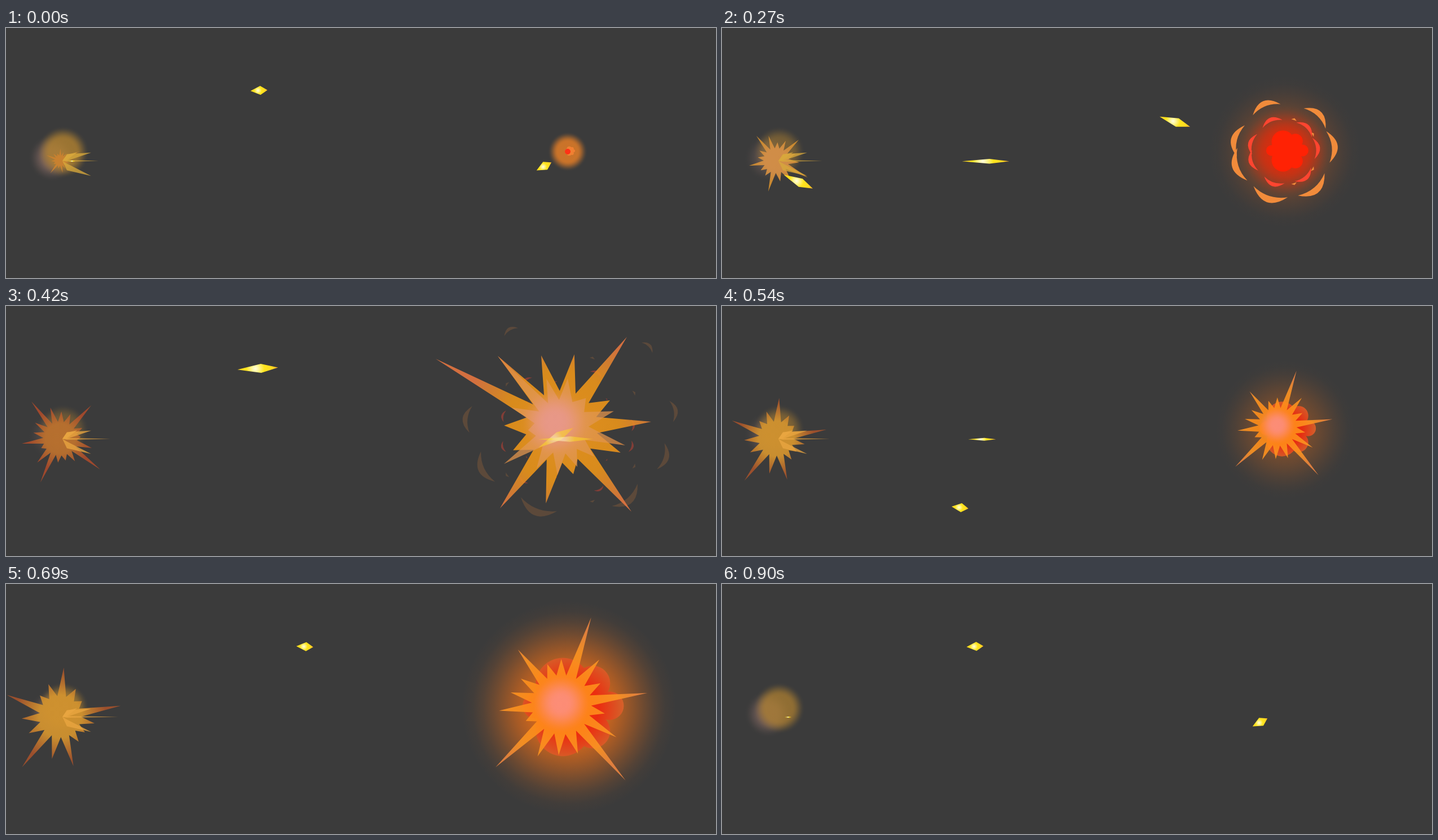
Animation of 1259x445 px, one loop 930 ms. Source, as an HTML page with a canvas:

```html
<!DOCTYPE html>
<html lang="en">
<head>
<meta charset="utf-8">
<title>Muzzle flash and explosion</title>
<style>
html, body { margin: 0; width: 100%; height: 100%; overflow: hidden; background: #3b3b3b; }
canvas { display: block; width: 100vw; height: 100vh; }
</style>
</head>
<body>
<canvas id="stage" width="1259" height="445"></canvas>
<script>
const ctx = document.getElementById('stage').getContext('2d');
const STEP = 30, FRAMES = 31, TAU = 2 * Math.PI, DEG = Math.PI / 180;
const MUZZLE = [96, 236], BLAST = [996, 220], BURST = [985, 215];

const ramp = (f, from, to) => Math.min(1, Math.max(0, (f - from) / (to - from)));
const lerp = (a, b, k) => a + (b - a) * k;
const noise = n => Math.abs(Math.sin(n * 127.1) * 43758.5) % 1;

function radial(x, y, r, stops) {
  const g = ctx.createRadialGradient(x, y, 0, x, y, r);
  for (const [at, color] of stops) g.addColorStop(at, color);
  return g;
}

// Draw in a local frame, then restore the context
function within([x, y], scale, alpha, paint) {
  if (alpha <= 0) return;
  ctx.save();
  ctx.translate(x, y);
  ctx.scale(scale, scale);
  ctx.globalAlpha = alpha;
  paint();
  ctx.restore();
}

// Soft disc: solid up to a share of its radius, then an S-shaped falloff
function glow(x, y, r, solid, rgb, alpha) {
  const stops = [];
  for (let i = 0; i <= 8; i++) {
    const k = i / 8, fade = 1 - k * k * (3 - 2 * k);
    stops.push([solid + (1 - solid) * k, `rgba(${rgb},${alpha * fade})`]);
  }
  ctx.fillStyle = radial(x, y, r, stops);
  ctx.beginPath();
  ctx.arc(x, y, r, 0, TAU);
  ctx.fill();
}

// Star with clockwise long spikes; shorter random ones fill the gaps between them
function star(center, { spikes, short, inner, gap, seed = 1 }, scale, fill, alpha) {
  const long = spikes.map(([x, y]) => {
    const dx = x - center[0], dy = y - center[1];
    return { a: Math.atan2(dy, dx), r: Math.hypot(dx, dy) };
  });
  within(center, scale, alpha, () => {
    const point = (a, r) => ctx.lineTo(r * Math.cos(a), r * Math.sin(a));
    ctx.beginPath();
    long.forEach(({ a, r }, i) => {
      const span = (long[(i + 1) % long.length].a - a + TAU) % TAU;
      const n = Math.max(1, Math.round(span / gap));
      for (let j = 0; j < n; j++) {
        const length = j ? short * lerp(.75, 1.25, noise(seed + i * 7 + j)) : r;
        point(a + span * j / n, length);
        point(a + span * (j + .5) / n, inner);
      }
    });
    ctx.fillStyle = fill;
    ctx.fill();
  });
}

// Five large lobes around a core; the right one is the smallest
function cloud(scale, fill, alpha = 1) {
  within([1000, 219], scale, alpha, () => {
    ctx.beginPath();
    ctx.arc(5, 0, 52, 0, TAU);
    const lobe = (x, y, r) => {
      ctx.moveTo(x + r, y);
      ctx.arc(x, y, r, 0, TAU);
    };
    for (const side of [-1, 1]) {
      lobe(-11, side * 34, 42);
      lobe(35, side * 37, 27);
    }
    lobe(61, -2, 22);
    lobe(-53, -2, 20);
    ctx.fillStyle = fill;
    ctx.fill();
  });
}

// Ring of crescents: heavier and closer at the bottom by the ring's lean
function ring({ angles, radius, chord, lean, chips, chipSize, color }, scale, alpha) {
  within(BLAST, scale, alpha, () => {
    ctx.fillStyle = color;
    for (const deg of angles) {
      const low = Math.sin((deg - 10) * DEG) * lean;
      const r = radius * (1 - low * .38), half = chord * (1 + low) / 2;
      ctx.save();
      ctx.rotate(deg * DEG);
      ctx.beginPath();
      ctx.moveTo(r, -half);
      ctx.quadraticCurveTo(r + half * 1.24, 0, r, half);
      ctx.quadraticCurveTo(r + half * .5, 0, r, -half);
      ctx.fill();
      ctx.restore();
    }
    for (const deg of chips) {
      for (const side of [-1, 1]) {
        ctx.save();
        ctx.rotate(side * deg * DEG);
        ctx.translate(radius * .77, 0);
        ctx.beginPath();
        ctx.moveTo(-chipSize * .2, -chipSize);
        ctx.lineTo(chipSize * .5, 0);
        ctx.lineTo(-chipSize * .2, chipSize);
        ctx.fill();
        ctx.restore();
      }
    }
  });
}

const ORANGE = '#f18b3b', RED = '#ff4530';
const outerAngles = [-120, -46, -10, 16, 49, 111, 155, 186];
const innerAngles = [-130, -63, -4, 15, 62, 131, 165, 192];
const tightAngles = [-112, -47, -6, 50, 108, 163, 194];
const wideRings = [
  { angles: outerAngles, radius: 175, chord: 46, lean: .5, chips: [29, 71, 143], chipSize: 5, color: ORANGE },
  { angles: innerAngles, radius: 114, chord: 21, lean: -.1, chips: [38, 104, 146], chipSize: 2.5, color: RED }
];
const tightRings = [
  { angles: tightAngles, radius: 78, chord: 58, lean: .1, chips: [31, 72], chipSize: 5, color: ORANGE },
  { angles: tightAngles, radius: 53, chord: 38, lean: 0, chips: [], chipSize: 0, color: RED }
];

const backBurst = {
  spikes: [[949, 88], [1101, 55], [1144, 206], [1109, 366], [876, 360], [762, 94], [872, 89]],
  short: 114, inner: 64, gap: .52
};
const frontBurst = { spikes: [[872, 89], [996, 129], [1098, 248], [883, 281]], short: 78, inner: 48, gap: .5 };
const lateBurst = {
  spikes: [[1030, 82], [1115, 197], [1082, 330], [885, 310], [919, 131]],
  short: 78, inner: 45, gap: .36
};

// Muzzle stars; each grows through its own full size at frame "at"
const flashes = [
  { at: 5, until: 6, short: 29, inner: 16, mid: '#e9a850', tip: '#e2a034',
    spikes: [[97, 198], [158, 206], [104, 274], [65, 276], [53, 219]] },
  { at: 9, until: 11, short: 37, inner: 22, mid: '#d48f48', tip: '#cf8c2e',
    spikes: [[61, 192], [136, 199], [152, 266], [82, 291], [48, 245]] },
  { at: 14, until: 17, short: 48, inner: 30, mid: '#b9702e', tip: '#a4492c',
    spikes: [[45, 170], [151, 177], [167, 291], [61, 314], [28, 245]] },
  { at: 21, until: 23, short: 58, inner: 34, mid: '#d0922f', tip: '#a0502c',
    spikes: [[102, 155], [196, 218], [118, 318], [33, 320], [8, 200]] },
  { at: 26, until: 29, short: 72, inner: 43, mid: '#f9c836', tip: '#fdd42c',
    spikes: [[97, 163], [151, 170], [188, 296], [121, 320], [53, 314], [22, 206], [43, 165]] }
];
const flashSize = f => f < 24 ? 24 + 3.7 * f : 84 + 3 * (f - 24);

function drawShards(f) {
  ctx.globalAlpha = .78;
  ctx.fillStyle = f < 12 ? '#d8a83c' : '#e9a641';
  for (const [deg, length, w] of [[26, 61, 6], [-15, 57, 6], [0, 68 + 1.5 * f, 1.5], [-27, 34, 5]]) {
    const x = length * Math.cos(deg * DEG), y = length * Math.sin(deg * DEG);
    ctx.beginPath();
    ctx.moveTo(100, 236.5);
    ctx.lineTo(108, 236.5 + y * .4 - w);
    ctx.lineTo(96 + x, 236.5 + y);
    ctx.lineTo(108, 236.5 + y * .4 + w);
    ctx.fill();
  }
  ctx.globalAlpha = 1;
}

function drawMuzzle(f) {
  const pulse = Math.cos(TAU * f / 26);
  glow(82, 231, 42, .3, '165,125,115', .38 + .17 * pulse);
  glow(101, 221, 46, .5, '178,130,48', .6 + .2 * pulse);
  const flash = flashes.find(s => f <= s.until);
  if (!flash) return;

  const full = flashSize(flash.at), bright = flash.at === 26;
  const fill = radial(0, 0, full, [[.35, flash.mid], [.75, flash.tip]]);
  star(MUZZLE, { ...flash, gap: .38, seed: flash.at }, flashSize(f) / full, f < 3 ? '#cb8230' : fill, .95);
  if (bright) glow(97, 230, 44, .1, '244,206,130', .8);
  else drawShards(f);
}

function drawBlast(f) {
  const [x, y] = BLAST;
  if (f < 3) {
    glow(x, y, 35 + f * 9, .5, '214,120,40', .92);
    cloud(.11 + f * .2, '#f08032');
    glow(x, y, 5.5 + f * 12, .8, '255,50,22', 1);
  } else if (f < 7) {
    glow(x - 1, y, lerp(50, 80, ramp(f, 2, 5)), .3, '245,38,6', 1);
  } else if (f < 13) {
    const fade = 1 - ramp(f, 9, 13);
    glow(x + 2, y, 135, .1, '205,95,30', .5 * fade);
    glow(x + 3, y, 82, .35, '230,40,10', .8 * fade);
    cloud(.48 + .06 * (f - 9), '#ff2204', fade);
  } else if (f >= 17 && f < 24) {
    const grow = ramp(f, 15, 22.5);
    glow(998, 220, lerp(80, 190, grow), .2, '215,105,28', grow);
    cloud(lerp(.3, 1.15, grow), radial(0, 0, 82, [[0, '#f82008'], [.55, '#ec2b10'], [1, '#d8602a']]), .95);
  } else if (f >= 24 && f < 30) {
    const fade = 1 - ramp(f, 26, 30), size = .66 + .14 * (f - 26);
    glow(1000, 218, 215, .1, '125,88,48', .6 * fade);
    glow(1000, 220, 140, .25, '205,45,28', .82 * fade);
    cloud(size, '#f0581e', fade);
    cloud(size * .58, '#ff331a', fade);
    within([1000, 226], size, fade, () => {
      ctx.fillStyle = '#f0581e';
      ctx.fillRect(-45, -1.5, 90, 3);
    });
  }

  // Debris: a tight ring opens, then the wide one fades
  if (f === 2 || f === 8 || f === 9) tightRings.forEach(r => ring(r, f === 9 ? 1 : .82, 1));
  const second = f >= 10;
  const open = second ? ramp(f, 8, 12) : ramp(f, 1, 5);
  const fade = second ? 1 - ramp(f, 9.5, 15) : 1 - ramp(f, 3, 7);
  if (f >= 3 && f !== 8 && f !== 9) {
    ring(wideRings[0], lerp(.6, 1, open), fade);
    ring(wideRings[1], lerp(.6, 1, open), Math.min(1, fade * 2));
  }
}

function drawBursts(f) {
  if (f >= 11 && f < 18) {
    const s = lerp(.55, 1, ramp(f, 11, 14));
    const back = radial(0, 0, 220, [[0, '#f79b1c'], [.45, '#ee9618'], [.65, '#e48530'], [.8, '#e87640']]);
    const front = radial(-12, -8, 160, [[0, '#ea9a78'], [.45, '#e09650'], [1, '#e0883c']]);
    star(BURST, backBurst, s, back, .88);
    star(BURST, frontBurst, s, front, .75);
    glow(973, 207, 62 * s, .2, '232,152,142', .85);
  } else if (f >= 18 && f < 24) {
    const s = lerp(.75, 1.17, ramp(f, 18, 23));
    const fill = radial(0, 0, 140, [[0, '#ff8a30'], [.3, '#ff8c18'], [.6, '#fb9422'], [.85, '#ea8440']]);
    star(BURST, lateBurst, s, fill, .9);
    glow(984, 212, 46 * s, .2, '252,142,126', .9);
  }
}

function kite(x, y, w, h, angle, alpha) {
  within([x, y], 1, alpha, () => {
    ctx.rotate(angle);
    ctx.beginPath();
    ctx.moveTo(-w / 2, 0);
    ctx.lineTo(w * .08, -h);
    ctx.lineTo(w / 2, 0);
    ctx.lineTo(w * .08, h);
    ctx.fillStyle = radial(-w * .06, 0, w * .56, [[0, '#fffde0'], [.14, '#fff7a0'], [.4, '#ffe41e'], [.75, '#ffd820'], [1, '#ffae28']]);
    ctx.fill();
  });
}

// Lanes: Bezier heights over the flight, and [start frame, speed] of each shot
const lanes = [
  { heights: [218, 43, 103, 243], shots: [[4.84, 169], [11.95, 169], [19.93, 140], [27.51, 140]] },
  { heights: [256, 410, 400, 226], shots: [[1.46, 168], [8.79, 168], [15.7, 140], [23.9, 140]] },
  { heights: [237, 237, 238, 237], shots: [[-.1, 172], [5.5, 105], [15.9, 172], [23.1, 172]], flat: true }
];

function bezier([a, b, c, d], u) {
  const v = 1 - u;
  return {
    y: a * v * v * v + 3 * b * v * v * u + 3 * c * v * u * u + d * u * u * u,
    slope: 3 * ((b - a) * v * v + 2 * (c - b) * v * u + (d - c) * u * u)
  };
}

function drawShots(frame) {
  const f = frame % 30, early = f < 18;
  const bursting = f >= 11 && f < 24;
  const long = early ? 30 + 3 * f : 30;
  const thin = early ? Math.min(98, 12 + 8 * f) : Math.max(12, 132 - 4.6 * f);
  for (const { heights, shots, flat } of lanes) {
    for (const [start, speed] of shots) {
      const age = (f - start + 30) % 30;
      const u = speed * age / 890, x = 100 + 890 * u;
      if (u > 1.02) continue;
      const { y, slope } = bezier(heights, u);
      const alpha = bursting && x > 900 ? .5 : 1;
      kite(x, y, flat ? thin : long, flat ? Math.max(1, thin * .05) : 8, Math.atan(slope / 890), alpha);
    }
  }
}

function draw(now) {
  const f = Math.floor(now / STEP) % FRAMES;
  ctx.fillStyle = '#3b3b3b';
  ctx.fillRect(0, 0, 1259, 445);
  drawBlast(f);
  drawMuzzle(f);
  drawBursts(f);
  drawShots(f);
}

const begin = performance.now();
function tick() {
  draw(performance.now() - begin);
  requestAnimationFrame(tick);
}
tick();
</script>
</body>
</html>
```
